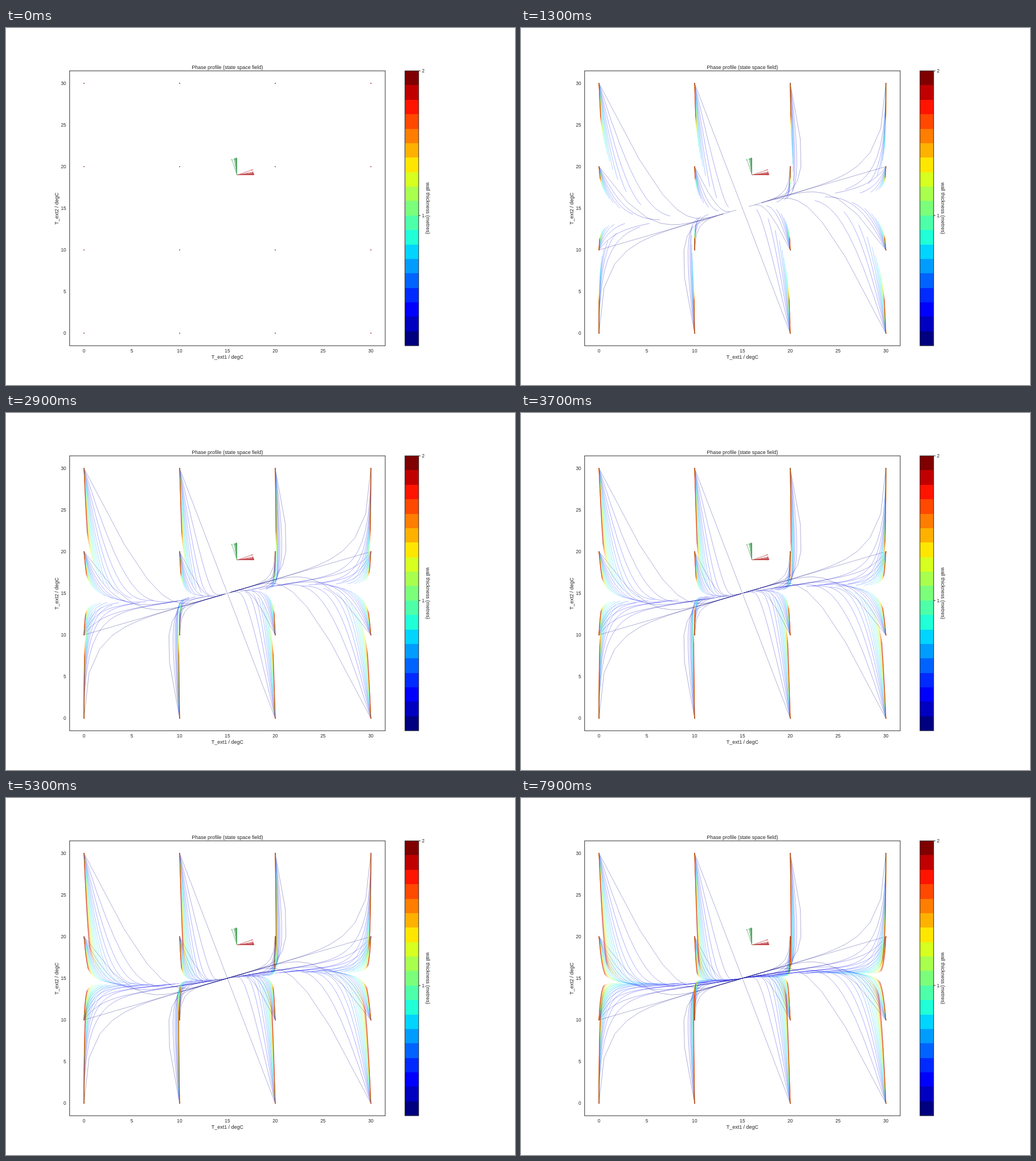
An HTML page for the animation above (8 s loop, 894 px wide and 626 px high).

```html
<!DOCTYPE html>
<html lang="en">
<head>
<meta charset="utf-8">
<title>Phase profile</title>
<style>
  html, body { margin: 0; width: 100%; height: 100%; overflow: hidden; background: #fff; }
  svg { display: block; width: 894px; height: 626px; }
  text { font-family: "Liberation Sans", Arial, sans-serif; font-size: 8.95px; fill: #262626; text-anchor: middle; }
  .tick { font-size: 8.2px; }
  .frame { fill: none; stroke: #262626; stroke-width: .95; }
  .curve { fill: none; stroke-width: .32; stroke-linecap: round; stroke-linejoin: round; }
</style>
</head>
<body>
<svg id="stage" viewBox="0 0 894 626"></svg>
<script>
const stage = document.getElementById('stage');
const LOOP = 8000, STEP = 100, WALLS = 20, REST = 15;
const box = { left: 111.75, right: 666.03, top: 75.12, bottom: 557.14 };
const bar = { left: 700.7, width: 24.1 };
const height = box.bottom - box.top;

const px = t => box.left + (t + 1.5) / 33 * (box.right - box.left);
const py = t => box.bottom - (t + 1.5) / 33 * height;

function add(tag, attrs, text) {
  const el = document.createElementNS('http://www.w3.org/2000/svg', tag);
  for (const key in attrs) el.setAttribute(key, attrs[key]);
  if (text !== undefined) el.textContent = text;
  stage.appendChild(el);
  return el;
}

// Piecewise linear jet colour map
function ramp(v, points) {
  for (let i = 1; i < points.length; i++) {
    const [x0, y0] = points[i - 1], [x1, y1] = points[i];
    if (v <= x1) return y0 + (y1 - y0) * (v - x0) / (x1 - x0);
  }
  return points[points.length - 1][1];
}
function jet(v) {
  const r = ramp(v, [[0, 0], [.35, 0], [.66, 1], [.89, 1], [1, .5]]);
  const g = ramp(v, [[0, 0], [.125, 0], [.375, 1], [.64, 1], [.91, 0], [1, 0]]);
  const b = ramp(v, [[0, .5], [.11, 1], [.34, 1], [.65, 0], [1, 0]]);
  return `rgb(${[r, g, b].map(c => Math.round(c * 255))})`;
}

// x' = c(y - x), y' = c(x - y) - g y: decay rates and slope of the slow eigenvector
function modes(w) {
  const c = .001875 / (w * w), g = .05 / w;
  const mean = c + g / 2, spread = Math.hypot(g / 2, c);
  const slow = mean - spread;
  return { slow, fast: mean + spread, slope: 1 - slow / c };
}

function trajectory(x, y, { slow, fast, slope }) {
  const norm = 1 + slope * slope;
  const a = (x + slope * y) / norm, b = (y - slope * x) / norm;
  return k => {
    const s = a * Math.exp(-slow * k), f = b * Math.exp(-fast * k);
    return px(REST + s - slope * f).toFixed(2) + ' ' + py(REST + slope * s + f).toFixed(2);
  };
}

function arrow(dx, dy, color) {
  const len = 30.3, angle = Math.atan2(-dy, dx) * 180 / Math.PI;
  add('path', {
    d: `M0 -.33H${len - 3}L${len - 3.4} -1.05L${len} 0L${len - 3.4} 1.05L${len - 3} .33H0Z`,
    fill: color,
    transform: `translate(${px(16)} ${py(19)}) rotate(${angle})`
  });
}

const walls = Array.from({ length: WALLS }, (_, i) => modes((i + 1) / 10));

const curves = [];
for (let x = 0; x <= 30; x += 10)
  for (let y = 0; y <= 30; y += 10) {
    walls.forEach((wall, i) => {
      const at = trajectory(x - REST, y - REST, wall);
      curves.push({
        el: add('path', { class: 'curve', stroke: jet(i / (WALLS - 1)) }),
        points: Array.from({ length: LOOP / STEP }, (_, k) => at(k))
      });
    });
    add('circle', { cx: px(x), cy: py(y), r: .7, fill: '#b0142a' });
  }

walls.forEach(({ slope }) => arrow(1, slope, '#c44e52'));
walls.forEach(({ slope }) => arrow(-slope, 1, '#55a868'));

add('rect', { class: 'frame', x: box.left, y: box.top, width: box.right - box.left, height });

const bins = WALLS - 1, binHeight = height / bins;
for (let i = 0; i < bins; i++)
  add('rect', {
    x: bar.left, y: box.bottom - (i + 1) * binHeight, width: bar.width, height: binHeight,
    fill: jet(i / (bins - 1)), 'shape-rendering': 'crispEdges'
  });
add('rect', { class: 'frame', x: bar.left, y: box.top, width: bar.width, height });

for (let t = 0; t <= 30; t += 5) {
  add('text', { class: 'tick', x: px(t), y: 569.2 }, t);
  add('text', { class: 'tick', x: 105.6, y: py(t) + 3, style: 'text-anchor:end' }, t);
}
for (const w of [1, 2]) {
  const y = box.bottom - (w - .1) / 1.9 * height;
  add('path', { class: 'frame', d: `M${bar.left + bar.width} ${y}h3.2` });
  add('text', { class: 'tick', x: 730.4, y: y + 3, style: 'text-anchor:start' }, w);
}

const midX = (box.left + box.right) / 2, midY = (box.top + box.bottom) / 2;
add('text', { x: midX, y: 71.5 }, 'Phase profile (state space field)');
add('text', { x: midX, y: 580 }, 'T_ext1 / degC');
add('text', { transform: `translate(91.5 ${midY + .5}) rotate(-90)` }, 'T_ext2 / degC');
add('text', { transform: `translate(738.3 ${midY}) rotate(90)` }, 'wall thickness (metres)');

let shown = -1;
function draw(step) {
  if (step === shown) return;
  shown = step;
  for (const { el, points } of curves)
    el.setAttribute('d', 'M' + points[0] + 'L' + points.slice(0, step + 1).join('L'));
}

const start = performance.now();
function tick() {
  const t = (performance.now() - start) % LOOP;
  draw(Math.max(0, Math.floor(t / STEP) - 1));
  requestAnimationFrame(tick);
}
tick();
</script>
</body>
</html>
```
